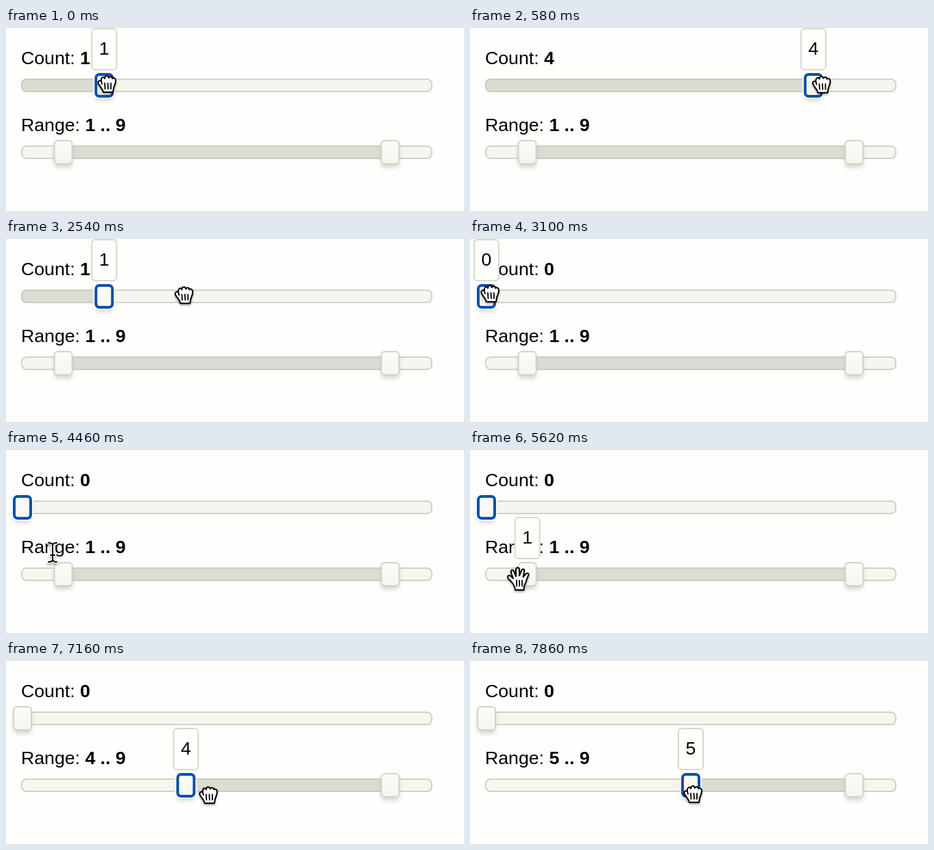
Animation of 668 by 268 pixels, one loop 8 s. Source, as an HTML page:

```html
<!DOCTYPE html>
<html lang="en">
<head>
<meta charset="utf-8">
<title>Slider demo</title>
<style>
  html, body { margin: 0; width: 100%; height: 100%; overflow: hidden; background: #fefefc; }
  svg { display: block; width: 668px; height: 268px; }
  text { font: 26.67px "Liberation Sans", Arial, sans-serif; fill: #000; }
  .bold { font-weight: bold; }
  .track { fill: #f6f6ee; stroke: #d2d2c8; stroke-width: 2; }
  .fill { fill: #dcdcd2; stroke: #cbcbc0; stroke-width: 2; }
  .knob { fill: url(#knob); stroke: #d3d3ca; stroke-width: 2; }
  .shadow { fill: #a0a098; opacity: .45; filter: url(#blur); }
  .halo { fill: #fefefc; }
  .ring { fill: url(#knob); stroke: #0a50a8; stroke-width: 4; }
  .tip rect { fill: #fefefc; stroke: #d8d8ce; stroke-width: 2; }
  .tip text { text-anchor: middle; }
  #cursor { filter: drop-shadow(0 2px 1.5px rgba(0, 0, 0, .35)); }
  #cursor path { fill: #fff; stroke: #000; stroke-width: 2; stroke-linejoin: round; stroke-linecap: round; }
  #cursor .line { fill: none; stroke-width: 1.8; }
  #cursor .edge { fill: none; stroke: #fff; stroke-width: 5; }
  #cursor .beam { fill: none; }
</style>
</head>
<body>
<svg viewBox="0 0 668 268">
  <defs>
    <linearGradient id="knob" x2="0" y2="1">
      <stop stop-color="#fcfcf8"/>
      <stop offset="1" stop-color="#f5f5ee"/>
    </linearGradient>
    <filter id="blur" x="-50%" y="-50%" width="200%" height="200%">
      <feGaussianBlur stdDeviation="3"/>
    </filter>
  </defs>
  <text x="22" y="53">Count: <tspan class="bold" id="countText"></tspan></text>
  <text x="22" y="151">Range: <tspan class="bold" id="rangeText"></tspan></text>
  <g id="sliders"></g>
  <g id="tips"></g>
  <g id="cursor">
    <g id="closed">
      <path d="M-8-4C-9-10-4-12-3-8C-3-13 2-13 3-9C4-12 8-11 8-8C10-10 13-8 13-5C13 0 11 2 10 6L9 12H-5C-6 7-10 4-12 0C-14-4-10-6-8-4Z"/>
      <path class="line" d="M-8-4L-7 0M-3-1L-2.5 7M1.5-1L2 7M6-1V7"/>
    </g>
    <g id="open">
      <path d="M-8 7C-11 3-16 0-15-3C-13-6-10-3-7 0L-10-8C-11-13-7-14-5.5-9L-3-3V-12C-3-17 2-17 2-12V-4L5-11C6-15 10-14 9-10L7.5-2L11-6C13-9 17-7 15-4C12 2 12 6 9 11L8.5 17H-4C-4 12-6 10-8 7Z"/>
      <path class="line" d="M-2 3V11M2 3V11M6 3V11"/>
    </g>
    <g id="ibeam">
      <path class="edge" d="M-6-14Q0-14 0-10Q0-14 6-14M0-10V10M-6 14Q0 14 0 10Q0 14 6 14M-3 4H3"/>
      <path class="beam" d="M-6-14Q0-14 0-10Q0-14 6-14M0-10V10M-6 14Q0 14 0 10Q0 14 6 14M-3 4H3"/>
    </g>
  </g>
</svg>
<script>
const LOOP = 8000, LEFT = 24, SPAN = 596;
const COUNT_MAX = 5, RANGE_MAX = 10, RANGE_HIGH = 9;
const RELEASE = 3620, GRAB = 6040;
const $ = id => document.getElementById(id);

// Pointer path: time, x, y
const path = [
  [0, 147, 82], [20, 147, 82], [700, 590, 83], [1100, 590, 83], [1420, 651, 83],
  [1500, 654, 83], [1960, 654, 83], [2680, 165, 82], [2960, 29, 80], [3620, 29, 80],
  [3900, 34, 100], [4460, 68, 150], [4900, 66, 180], [5200, 70, 188], [5640, 70, 188],
  [6040, 76, 190], [6300, 88, 190], [6700, 148, 190], [6880, 222, 195],
  [7300, 331, 197], [7720, 331, 190], [7820, 331, 190], [7860, 325, 195]
];

const knobMarkup = (id, y) => `<g id="${id}">
  <rect class="shadow" x="-13" y="${y + 6}" width="26" height="34" rx="5"/>
  <rect class="knob" x="-13" y="${y + 1}" width="26" height="34" rx="5"/>
  <g class="focus">
    <rect class="halo" x="-16" y="${y - 2}" width="32" height="40" rx="8"/>
    <rect class="ring" x="-12" y="${y + 2}" width="24" height="32" rx="5"/>
  </g></g>`;
const barMarkup = (id, y) => `
  <rect class="track" x="23" y="${y}" width="598" height="18" rx="7"/>
  <rect class="fill" id="${id}" x="23" y="${y}" height="18" rx="7"/>`;
const tipMarkup = (id, y) => `<g class="tip" id="${id}">
  <rect x="-18" y="${y + 1}" width="36" height="60" rx="5"/>
  <text y="${y + 39}"></text></g>`;

$('sliders').innerHTML = barMarkup('countFill', 75) + barMarkup('rangeFill', 173) +
  knobMarkup('countKnob', 66) + knobMarkup('lowKnob', 164) + knobMarkup('highKnob', 164);
$('tips').innerHTML = tipMarkup('countTip', 0) + tipMarkup('rangeTip', 98);

const clamp = (v, lo, hi) => Math.min(hi, Math.max(lo, v));
const toX = (value, max) => LEFT + SPAN * value / max;
const toValue = (x, max, hi = max) => clamp(Math.floor((x - LEFT) / SPAN * max), 0, hi);
const show = (el, on) => { el.style.display = on ? '' : 'none'; };
const move = (el, x, y = 0) => el.setAttribute('transform', `translate(${x} ${y})`);

function pointer(t) {
  const i = path.findIndex(p => p[0] > t);
  if (i < 0) return path[path.length - 1].slice(1);
  const [t0, x0, y0] = path[i - 1], [t1, x1, y1] = path[i];
  const k = (t - t0) / (t1 - t0);
  return [x0 + (x1 - x0) * k, y0 + (y1 - y0) * k];
}

function setKnob(id, x, focus) {
  move($(id), x);
  $(id).querySelector('.focus').style.opacity = focus;
}

function setTip(id, x, value, on) {
  move($(id), x);
  $(id).querySelector('text').textContent = value;
  show($(id), on);
}

function setFill(id, from, to) {
  $(id).setAttribute('x', from);
  $(id).setAttribute('width', to - from);
  show($(id), to - from > 2);
}

function draw(t) {
  const [x, y] = pointer(t);
  const count = t < RELEASE ? toValue(x, COUNT_MAX) : 0;
  const low = t < GRAB ? 1 : Math.max(1, toValue(x, RANGE_MAX, RANGE_HIGH));
  const countX = toX(count, COUNT_MAX);
  const lowX = toX(low, RANGE_MAX), highX = toX(RANGE_HIGH, RANGE_MAX);
  const blur = clamp((t - GRAB) / 120, 0, 1);

  $('countText').textContent = count;
  $('rangeText').textContent = `${low} .. ${RANGE_HIGH}`;
  setFill('countFill', 23, countX);
  setFill('rangeFill', lowX, highX);
  setKnob('countKnob', countX, 1 - blur);
  setKnob('lowKnob', lowX, blur);
  setKnob('highKnob', highX, 0);

  const overCount = y < 102, overRange = y > 168;
  const dragging = t < RELEASE || t >= GRAB;
  setTip('countTip', countX, count, overCount);
  setTip('rangeTip', lowX, low, overRange);

  move($('cursor'), x, y);
  show($('closed'), dragging);
  show($('open'), !dragging && (overCount || overRange));
  show($('ibeam'), !overCount && !overRange);
}

const start = performance.now();
function frame() {
  draw((performance.now() - start) % LOOP);
  requestAnimationFrame(frame);
}
frame();
</script>
</body>
</html>
```
